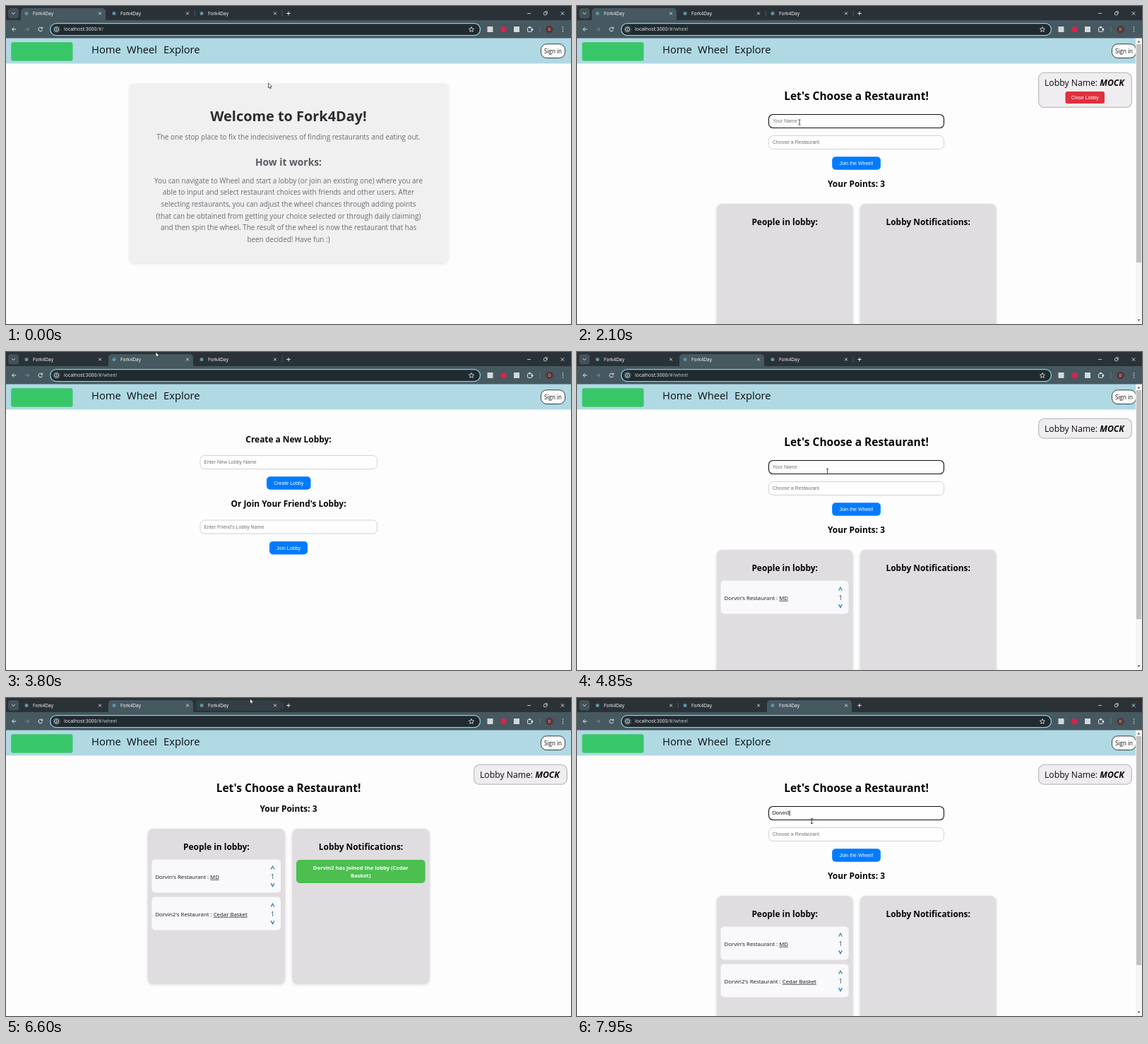
These frames come from a looping animation (800 px wide and 450 px high, 8 s). An HTML page with a canvas:

```html
<!DOCTYPE html>
<html lang="en">
<head>
<meta charset="utf-8">
<title>Fork4Day</title>
<style>
html, body { margin: 0; width: 100%; height: 100%; overflow: hidden; background: #fefdfe; }
canvas { display: block; width: 800px; height: 450px; }
</style>
</head>
<body>
<canvas id="stage"></canvas>
<script>
const LOOP = 8000;
const UI = '"Open Sans", "Noto Sans", sans-serif';
const FORM = '"Liberation Sans", Arial, sans-serif';
const APP = 'Fork4Day', LOBBY = 'MOCK', USER = 'Dorvin';
const PAGE = '#fefdfe', TEAL = '#465860', STRIP = '#2a3238', BLUE = '#007bff';

const canvas = document.getElementById('stage');
const c = canvas.getContext('2d');
const dpr = window.devicePixelRatio || 1;
canvas.width = 800 * dpr;
canvas.height = 450 * dpr;

const key = (field, text, focus, start, step) => ({ field, text, focus, start, step });
const scenes = [
  { at: 0, view: 'home', tab: 0 },
  { at: 920, view: 'wheel', tab: 0, keys: [key('create', LOBBY, 1130, 1200, 50)] },
  { at: 1700, view: 'lobby', tab: 0, keys: [key('name', USER, 2100, 2300, 60), key('food', 'MD', 2780, 2930, 90)] },
  { at: 3250, view: 'joined', tab: 0 },
  { at: 3700, view: 'wheel', tab: 1, keys: [key('friend', LOBBY, 4050, 4120, 50)] },
  { at: 4550, view: 'lobby', tab: 1, keys: [key('name', USER + '2', 4780, 5000, 45), key('food', 'Cedar Basket', 5330, 5400, 28)] },
  { at: 5900, view: 'joined', tab: 1 },
  { at: 6650, view: 'wheel', tab: 2, keys: [key('friend', LOBBY, 6950, 7020, 50)] },
  { at: 7400, view: 'lobby', tab: 2, keys: [key('name', USER + '3', 7610, 7680, 38)] }
];

// Pointer waypoints: time, x, y
const path = [
  [0, 371.5, 109], [350, 371.5, 109], [850, 192, 64], [930, 192, 64], [1130, 310, 158],
  [1220, 312, 164], [1430, 312, 164], [1630, 400, 187], [1740, 400, 187], [2080, 315, 164.5],
  [2980, 315, 164.5], [3190, 395, 224], [3290, 395, 224], [3640, 212, 2], [3700, 212, 0],
  [3820, 212, 0], [4040, 330, 250], [4290, 330, 250], [4480, 400, 279], [4580, 400, 279],
  [4770, 354.5, 165], [4840, 354.5, 169], [5660, 354.5, 169], [5840, 395, 224], [5970, 395, 224],
  [6480, 345.5, 3], [6580, 345.5, 1], [6690, 345.5, 1], [6940, 332, 248], [7190, 332, 248],
  [7340, 400, 279], [7420, 400, 279], [7600, 332.5, 168], [7680, 332.5, 174], [8000, 332.5, 174]
];

const inputs = {
  wheel: {
    create: { x: 275, y: 146.5, w: 250.5, hint: 'Enter New Lobby Name' },
    friend: { x: 275, y: 238, w: 250.5, hint: "Enter Friend's Lobby Name" }
  },
  lobby: {
    name: { x: 271.5, y: 153.5, w: 248, hint: 'Your Name' },
    food: { x: 271.5, y: 183.5, w: 248, hint: 'Choose a Restaurant' }
  }
};
const buttons = {
  wheel: [[369, 176, 62.5, 'Create Lobby'], [373, 267.7, 54, 'Join Lobby']],
  lobby: [[361.2, 213, 68.7, 'Join the Wheel!']]
};

function text(str, x, y, size, color, { font = UI, style = '', align = 'left' } = {}) {
  c.font = `${style} ${size}px ${font}`;
  c.fillStyle = color;
  c.textAlign = align;
  c.fillText(str, x, y + size * 0.357);
  return c.measureText(str).width;
}
const title = (str, x, y, size = 11.9, color = '#050505') =>
  text(str, x, y, size, color, { style: 'bold', align: 'center' });

function rect(x, y, w, h, fill) {
  c.fillStyle = fill;
  c.fillRect(x, y, w, h);
}

function box(x, y, w, h, r, fill, stroke, line = 1) {
  c.beginPath();
  c.roundRect(x, y, w, h, r);
  if (fill) { c.fillStyle = fill; c.fill(); }
  if (stroke) { c.strokeStyle = stroke; c.lineWidth = line; c.stroke(); }
}

function shadowed(draw) {
  c.save();
  c.shadowColor = 'rgba(0,0,0,.12)';
  c.shadowBlur = 4 * dpr;
  c.shadowOffsetY = dpr;
  draw();
  c.restore();
}

function dot(x, y, r, fill) {
  c.beginPath();
  c.arc(x, y, r, 0, 7);
  c.fillStyle = fill;
  c.fill();
}

function line(color, width, ...pts) {
  c.beginPath();
  for (let i = 0; i < pts.length; i += 2) c.lineTo(pts[i], pts[i + 1]);
  c.strokeStyle = color;
  c.lineWidth = width;
  c.stroke();
}

function cross(x, y, r, color) {
  line(color, 0.9, x - r, y - r, x + r, y + r);
  line(color, 0.9, x - r, y + r, x + r, y - r);
}

function drawTabs(active, p) {
  rect(0, 0, 800, 21, STRIP);
  box(3, 3, 15, 14.5, 4, '#435159');
  line('#e8eef0', 1, 8.3, 9.3, 10.5, 11.5, 12.7, 9.3);
  for (let i = 0; i < 3; i++) {
    const x = 21 + i * 124;
    const hover = p.y < 18 && p.x > x && p.x < x + 120;
    if (i === active) {
      box(x, 3, 120, 20, [5, 5, 0, 0], TEAL);
    } else {
      if (hover) box(x, 3, 120, 15, 4, '#333e45');
      if (i + 1 !== active) line('#56646b', 0.8, x + 122.2, 6.5, x + 122.2, 14.5);
    }
    dot(x + 8, 10.5, 2.5, '#5f93a3');
    text(APP, x + 17, 10.5, 6.6, '#ffffff');
    cross(x + 112, 10.5, 1.9, '#e3e8ea');
  }
  line('#e3e8ea', 1, 397.3, 10.5, 402.7, 10.5);
  line('#e3e8ea', 1, 400, 7.8, 400, 13.2);
  line('#e3e8ea', 0.8, 738, 10.5, 743, 10.5);
  box(761.5, 8.8, 3.8, 3.8, 0.8, null, '#e3e8ea', 0.8);
  line('#e3e8ea', 0.7, 763, 7.7, 766.4, 7.7, 766.4, 11.2);
  cross(788, 10.5, 2.2, '#e3e8ea');
}

function arrow(x, y, dir, color) {
  line(color, 1, x - 2.8, y, x + 2.8, y);
  line(color, 1, x + dir * 0.2, y - 2.7, x + dir * 2.9, y, x + dir * 0.2, y + 2.7);
}

function drawToolbar(view) {
  const ink = '#e6ecee';
  rect(0, 20, 800, 25.5, TEAL);
  arrow(11.5, 33, -1, ink);
  arrow(30, 33, 1, '#7c8a91');
  c.beginPath();
  c.arc(48.8, 33, 2.8, 0.3, 5.6);
  c.strokeStyle = ink;
  c.lineWidth = 1;
  c.stroke();
  line(ink, 1, 51.6, 29.8, 51.6, 32, 49.4, 32);

  box(62.7, 24.6, 608.8, 17, 8.5, '#202a2f', '#85d0df', 1.3);
  dot(71.5, 33, 5.6, '#3b484f');
  c.beginPath();
  c.arc(71.5, 33, 3, 0, 7);
  c.strokeStyle = ink;
  c.lineWidth = 0.8;
  c.stroke();
  line(ink, 0.8, 71.5, 32.6, 71.5, 34.6);
  line(ink, 0.8, 71.5, 31.1, 71.5, 31.9);
  const w = text('localhost:3000', 82, 33, 6.9, '#f3f6f7');
  text(view === 'home' ? '/#/' : '/#/wheel', 82 + w, 33, 6.9, '#c3ccd0');

  c.beginPath();
  for (let i = 0; i < 10; i++) {
    const r = i % 2 ? 1.7 : 3.8, a = -Math.PI / 2 + i * Math.PI / 5;
    c.lineTo(659 + r * Math.cos(a), 33.3 + r * Math.sin(a));
  }
  c.closePath();
  c.strokeStyle = ink;
  c.lineWidth = 0.8;
  c.stroke();

  rect(681.5, 29, 8, 8, '#d3d9db');
  dot(704.5, 33, 4.3, '#d8234b');
  rect(719, 29, 8, 8, '#d3d9db');
  box(738.6, 30.6, 5.8, 5.8, 0.7, null, ink, 1);
  dot(741.5, 30, 1.3, ink);
  dot(745, 33.4, 1.3, ink);
  line('#6c7c84', 0.8, 756, 28.5, 756, 37.5);
  dot(769.5, 33, 5.3, '#5b3437');
  text('D', 769.5, 33, 5.5, '#f0dcdc', { align: 'center' });
  for (const y of [30, 33, 36]) dot(788.5, y, 0.8, ink);
}

function drawHeader(scroll) {
  rect(0, 45, scroll ? 791 : 800, 36.5, '#b0d9e4');
  box(7.2, 51.3, 87.3, 26.5, 3, '#38c768');
  text('Home', 121, 62.2, 14.75, '#0a0f11');
  text('Wheel', 171, 62.2, 14.75, '#0a0f11');
  text('Explore', 223, 62.2, 14.75, '#0a0f11');
  box(757.5, 53.8, 34, 19.8, 8, '#fefefe', '#30383b', 1);
  text('Sign in', 774.5, 64, 8.1, '#111', { align: 'center' });
}

function drawScrollbar(end) {
  rect(791, 45, 9, 405, '#f5f4f6');
  rect(792, 54, 7, end - 54, '#c1c0c2');
  c.fillStyle = '#555';
  for (const [y, d] of [[50.5, -1], [444.5, 1]]) {
    c.beginPath();
    c.moveTo(793.5, y - d);
    c.lineTo(797.5, y - d);
    c.lineTo(795.5, y + d * 1.4);
    c.fill();
  }
}

function drawHome() {
  const grey = '#666c70', size = 9.92;
  shadowed(() => box(175, 110, 451, 253.5, 6, '#f1f0f1'));
  title(`Welcome to ${APP}!`, 400, 155.5, 19.9, '#2b2d30');
  const center = { align: 'center' };
  text('The one stop place to fix the indecisiveness of finding restaurants and eating out.', 400, 185.5, size, grey, center);
  title('How it works:', 400, 221, 13.8, '#555b5f');
  [
    'You can navigate to Wheel and start a lobby (or join an existing one) where you are',
    'able to input and select restaurant choices with friends and other users. After',
    'selecting restaurants, you can adjust the wheel chances through adding points',
    '(that can be obtained from getting your choice selected or through daily claiming)',
    'and then spin the wheel. The result of the wheel is now the restaurant that has',
    'been decided! Have fun :)'
  ].forEach((s, i) => text(s, 400, 247 + i * 16.7, size, grey, center));
}

function drawForm(scene, t) {
  const keys = scene.keys;
  const focused = keys.filter(k => t >= k.focus).pop();
  for (const [id, f] of Object.entries(inputs[scene.view])) {
    const k = keys.find(k => k.field === id);
    const on = focused && focused.field === id;
    const count = k ? Math.max(0, Math.floor((t - k.start) / k.step) + 1) : 0;
    const typed = k ? k.text.slice(0, count) : '';
    box(f.x, f.y, f.w, 19, 6, '#fefefe', on ? '#111' : '#d2d1d3', on ? 1.1 : 1);
    const w = text(typed || f.hint, f.x + 5.3, f.y + 9.4, 7, typed ? '#111' : '#757575', { font: FORM });
    if (on && t >= k.start - 100) {
      const x = f.x + 5.6 + (typed ? w : 0);
      line('#000', 0.7, x, f.y + 5.6, x, f.y + 13.6);
    }
  }
  for (const [x, y, w, label] of buttons[scene.view]) {
    box(x, y + 0.2, w, 18.6, 5, BLUE);
    text(label, x + w / 2, y + 9.4, 7, '#fff', { font: FORM, align: 'center' });
  }
}

function drawWheel(scene, t) {
  title('Create a New Lobby:', 400, 123.5);
  title("Or Join Your Friend's Lobby:", 400, 214.5);
  drawForm(scene, t);
}

function drawLobbyName(host, right) {
  const x = right - 133;
  box(x + 0.6, 94.4, 131.8, host ? 49 : 27.8, 8, '#efedf0', '#bdbcbe', 1.2);
  const w = text('Lobby Name: ', x + 9, 108.3, 12.2, '#080808');
  text(LOBBY, x + 9 + w, 108.3, 12.2, '#080808', { style: 'italic bold' });
  if (host) {
    box(x + 38.5, 121, 55.5, 17, 3, '#e02f3d');
    text('Close Lobby', x + 66.3, 129.5, 7, '#fff', { font: FORM, align: 'center' });
  }
}

function drawPerson(x, y, w, who, food) {
  box(x, y, w, 47, 5, '#f9f8fa');
  const tx = x + 5, ty = y + 24.5;
  const lead = text(`${who}'s Restaurant : `, tx, ty, 7.85, '#161616');
  const fw = text(food, tx + lead, ty, 7.85, '#161616');
  line('#161616', 0.7, tx + lead, ty + 4.3, tx + lead + fw, ty + 4.3);
  const ax = x + w - 11.5;
  line('#2788a8', 1.2, ax - 2.4, y + 14, ax, y + 9.5, ax + 2.4, y + 14);
  text('1', ax, ty, 8.2, '#124a49', { align: 'center' });
  line('#1f82bb', 1.2, ax - 2.4, y + 33.6, ax, y + 38.1, ax + 2.4, y + 33.6);
}

function drawNotice(x, y, w, lines) {
  box(x, y, w, 11 + lines.length * 11, 5, '#4cbf50');
  lines.forEach((s, i) => title(s, x + w / 2, y + 11.5 + i * 11.2, 7.6, '#fff'));
}

function drawLobby(scene, t) {
  const joined = scene.view === 'joined';
  const host = scene.tab === 0;
  const mid = joined ? 400 : 395.5;
  const dy = joined ? -95 : 0;
  const w = joined ? 194.6 : 193;
  const left = mid + 0.2 - 5 - w, right = mid + 0.2 + 5;

  drawLobbyName(host, joined ? 795 : 786);
  title("Let's Choose a Restaurant!", mid, 127.3, 15.5);
  if (!joined) drawForm(scene, t);
  title('Your Points: 3', mid, 252 + dy);
  for (const x of [left, right]) {
    shadowed(() => box(x, 280 + dy, w, 220, 8, '#dfdde0'));
  }
  title('People in lobby:', left + w / 2, 305.3 + dy);
  title('Lobby Notifications:', right + w / 2, 305.3 + dy);

  const people = [[3250, USER, 'MD'], [5900, USER + '2', 'Cedar Basket']];
  people.filter(p => t >= p[0]).forEach(([, who, food], i) =>
    drawPerson(left + 5.8, 323.5 + dy + i * 53, w - 12, who, food));
  if (joined) {
    drawNotice(right + 5.8, 324 + dy, w - 12, host
      ? [`${USER} has joined the lobby (MD)`]
      : [`${USER}2 has joined the lobby (Cedar`, 'Basket)']);
  }
}

function pointerAt(t) {
  let i = 1;
  while (i < path.length - 1 && path[i][0] < t) i++;
  const [t0, x0, y0] = path[i - 1], [t1, x1, y1] = path[i];
  const k = Math.min(1, (t - t0) / (t1 - t0));
  const e = k * k * (3 - 2 * k);
  return { x: x0 + (x1 - x0) * e, y: y0 + (y1 - y0) * e };
}

function pointerKind(p, view) {
  const within = (x, y, w, h) => p.x >= x && p.x <= x + w && p.y >= y && p.y <= y + h;
  if (Object.values(inputs[view] || {}).some(f => within(f.x, f.y, f.w, 21))) return 'beam';
  if ((buttons[view] || []).some(b => within(b[0], b[1], b[2], 19))) return 'hand';
  return within(121, 53, 153, 18) ? 'hand' : 'arrow';
}

function drawPointer(p, view) {
  const kind = pointerKind(p, view);
  c.save();
  c.translate(p.x, p.y);
  if (kind === 'beam') {
    line('#222', 0.8, 0, -3.3, 0, 3.3);
    line('#222', 0.8, -1.6, -3.5, 1.6, -3.5);
    line('#222', 0.8, -1.6, 3.5, 1.6, 3.5);
  } else {
    const pts = kind === 'hand'
      ? [-0.8, 0, 0.6, 0, 0.6, 3, 4, 3.8, 4, 6.4, 3, 8.6, -0.6, 8.6, -2.8, 5.2, -2, 4.6, -0.8, 5.6]
      : [0, 0, 0, 7, 1.6, 5.6, 2.7, 8, 3.8, 7.5, 2.8, 5.2, 5, 5];
    c.beginPath();
    for (let i = 0; i < pts.length; i += 2) c.lineTo(pts[i], pts[i + 1]);
    c.closePath();
    c.fillStyle = '#fff';
    c.fill();
    c.strokeStyle = '#222';
    c.lineWidth = 0.7;
    c.stroke();
  }
  c.restore();
}

function draw(t) {
  const scene = scenes.filter(s => t >= s.at).pop();
  const { view, tab } = scene;
  const p = pointerAt(t);
  const scroll = view === 'lobby';
  c.setTransform(dpr, 0, 0, dpr, 0, 0);
  rect(0, 0, 800, 450, PAGE);
  if (view === 'home') drawHome();
  else if (view === 'wheel') drawWheel(scene, t);
  else drawLobby(scene, t);
  drawHeader(scroll);
  if (scroll) drawScrollbar(tab === 0 ? 363 : 378);
  drawTabs(tab, p);
  drawToolbar(view);
  drawPointer(p, view);
}

const begin = performance.now();
function tick() {
  draw((performance.now() - begin) % LOOP);
  requestAnimationFrame(tick);
}
tick();
</script>
</body>
</html>
```
